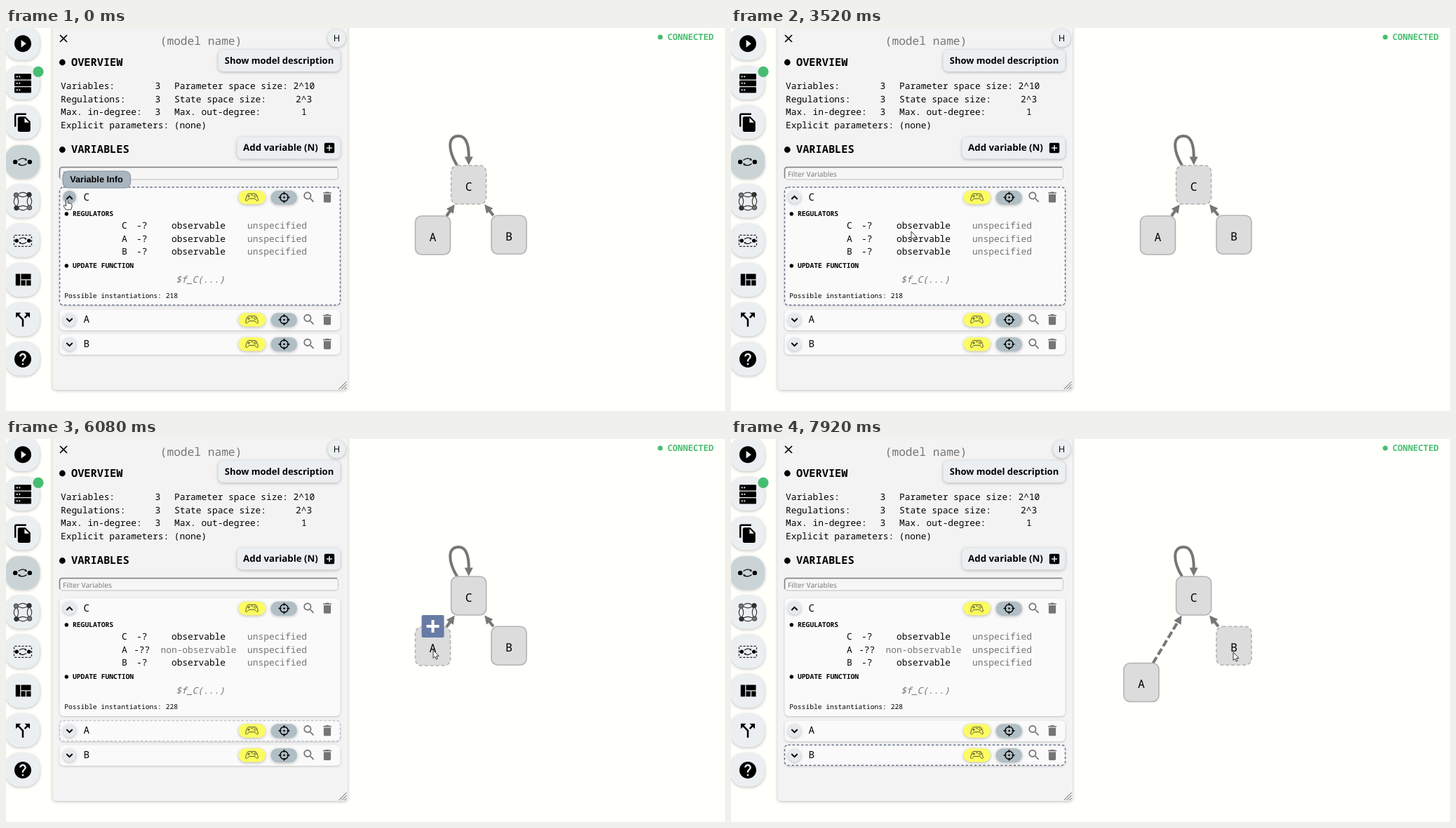
An HTML page that plays this animation: 1025 by 546 pixels, repeating every 8000 ms.

```html
<!DOCTYPE html>
<html lang="en">
<head>
<meta charset="utf-8">
<title>Regulatory network editor</title>
<style>
html, body { margin: 0; width: 100%; height: 100%; overflow: hidden; background: #fffffb; }
svg { display: block; width: 100vw; height: 100vh; }
text { white-space: pre; text-rendering: geometricPrecision; }
.mono { font-family: "Noto Sans Mono", "DejaVu Sans Mono", monospace; }
.sans { font-family: "Open Sans", "Noto Sans", sans-serif; }
.arial { font-family: "Liberation Sans", sans-serif; }
.raised { filter: drop-shadow(0 1px 2px #0004); }
.card { filter: drop-shadow(0 1px 1.5px #0003); }
</style>
</head>
<body>
<svg viewBox="0 0 1025 546"><g id="base"></g><g id="live"></g></svg>
<script>
const LOOP = 8000, STEP = 80;
const BUTTON = '#eceff1', GREY = '#757575', SLATE = '#b0bec5', GREEN = '#48bd72';

const ICON = {
  play: 'M12 2C6.48 2 2 6.48 2 12s4.48 10 10 10 10-4.48 10-10S17.52 2 12 2zm-2 14.5v-9l6 4.5-6 4.5z',
  copy: 'M16 1H4c-1.1 0-2 .9-2 2v14h2V3h12V1zm-1 4l6 6v10c0 1.1-.9 2-2 2H7.99C6.89 23 6 22.1 6 21l.01-14c0-1.1.89-2 1.99-2h7zm-1 7h5.5L14 6.5V12z',
  quilt: 'M10 18h5v-6h-5v6zm-6 0h5V5H4v13zm12 0h5v-6h-5v6zM10 5v6h11V5H10z',
  split: 'M14 4l2.29 2.29-2.88 2.88 1.42 1.42 2.88-2.88L20 10V4zm-4 0H4v6l2.29-2.29 4.71 4.7V20h2v-8.41l-5.29-5.3z',
  help: 'M12 2C6.48 2 2 6.48 2 12s4.48 10 10 10 10-4.48 10-10S17.52 2 12 2zm1 17h-2v-2h2v2zm2.07-7.75l-.9.92C13.45 12.9 13 13.5 13 15h-2v-.5c0-1.1.45-2.1 1.17-2.83l1.24-1.26c.37-.36.59-.86.59-1.41 0-1.1-.9-2-2-2s-2 .9-2 2H8c0-2.21 1.79-4 4-4s4 1.79 4 4c0 .88-.36 1.68-.93 2.25z',
  search: 'M15.5 14h-.79l-.28-.27C15.41 12.59 16 11.11 16 9.5 16 5.91 13.09 3 9.5 3S3 5.91 3 9.5 5.91 16 9.5 16c1.61 0 3.09-.59 4.23-1.57l.27.28v.79l5 4.99L20.49 19l-4.99-5zm-6 0C7.01 14 5 11.99 5 9.5S7.01 5 9.5 5 14 7.01 14 9.5 11.99 14 9.5 14z',
  trash: 'M6 19c0 1.1.9 2 2 2h8c1.1 0 2-.9 2-2V7H6v12zM19 4h-3.5l-1-1h-5l-1 1H5v2h14V4z',
  add: 'M19 3H5c-1.11 0-2 .9-2 2v14c0 1.1.89 2 2 2h14c1.1 0 2-.9 2-2V5c0-1.1-.9-2-2-2zm-2 10h-4v4h-2v-4H7v-2h4V7h2v4h4v2z',
  close: 'M19 6.41L17.59 5 12 10.59 6.41 5 5 6.41 10.59 12 5 17.59 6.41 19 12 13.41 17.59 19 19 17.59 13.41 12z'
};

const icon = (name, x, y, k = 1.2, fill = '#000') =>
  `<path d="${ICON[name]}" fill="${fill}" transform="translate(${x} ${y}) scale(${k}) translate(-12 -12)"/>`;
const rect = (x, y, w, h, r, fill, more = '') =>
  `<rect x="${x}" y="${y}" width="${w}" height="${h}" rx="${r}" fill="${fill}" ${more}/>`;
const dot = (x, y, r, fill = '#000', more = '') => `<circle cx="${x}" cy="${y}" r="${r}" fill="${fill}" ${more}/>`;
const line = (d, color, width, more = '') => `<path d="${d}" fill="none" stroke="${color}" stroke-width="${width}" ${more}/>`;
const at = (x, y, body) => `<g transform="translate(${x} ${y})">${body}</g>`;
const text = (x, y, s, size, more = '', font = 'mono') =>
  `<text class="${font}" x="${x}" y="${y}" font-size="${size}" ${more}>${s}</text>`;
const BOLD = 'font-weight="700"', HEADING = 'font-weight="600"', MID = 'text-anchor="middle"', RAISED = 'class="raised"';

function networkIcon(x, y, k) {
  return `<g transform="translate(${x} ${y}) scale(${k})">` + dot(-10.3, 0, 3.2) + dot(10.3, 0, 3.2) +
    line('M-6-2.5Q0-7 5-3.5M6 2.5Q0 7-5 3.5', '#000', 1.3) +
    '<path d="M6.5-2L2.8-2.5 4.8-5.4ZM-6.5 2L-2.8 2.5-4.8 5.4Z"/></g>';
}

function ringIcon(x, y) {
  const side = [0, 90, 180, 270].map(a => `<g transform="rotate(${a})">` +
    line('M-6-10.5Q0-15 6-10.5M-6-8Q0-4.5 6-8', '#333', 1.1) +
    dot(-9.5, -9, 3.3, a % 180 ? '#333' : GREY, 'stroke="#222" stroke-width=".8"') + '</g>');
  return at(x, y, side.join(''));
}

function sidebar() {
  const ys = [...Array(9).keys()].map(i => 22.3 + i * 56.2);
  let s = ys.map((y, i) => rect(-1, y - 24, 49, 47.5, 20, i === 3 ? '#cad4d7' : BUTTON, RAISED)).join('');
  s += icon('play', 24, ys[0]) + icon('copy', 24, ys[2]) + icon('quilt', 24, ys[6], 1.28) +
    icon('split', 24, ys[7], 1.25) + icon('help', 24, ys[8]);
  for (const y of [65.2, 74.7, 84.2]) s += rect(12, y, 24, 8.2, 1.2, '#000') +
    dot(15.8, y + 4.1, 1.1, BUTTON) + dot(19.3, y + 4.1, 1.1, BUTTON);
  s += networkIcon(23.5, ys[3], 1) + ringIcon(24, ys[4]);
  s += rect(11.5, ys[5] - 8, 25, 16, 1, 'none', 'stroke="#222" stroke-width="1.2" stroke-dasharray="3 2"') + networkIcon(24, ys[5], .85);
  return s + dot(46, 62.3, 7.6, GREEN);
}

function overview() {
  const rows = [
    ['Variables:', 3, 'Parameter space size:', 409.5, '2^10'],
    ['Regulations:', 3, 'State space size:', 413, '2^3'],
    ['Max. in-degree:', 3, 'Max. out-degree:', 421, '1']];
  return rows.map(([a, n, b, x, v], i) => {
    const y = 87 + i * 18.6;
    return text(78, y, a, 12.85) + text(212.5, y, n, 12.85) + text(240, y, b, 12.85) + text(x, y, v, 12.85);
  }).join('') + text(78, 143, 'Explicit parameters: (none)', 12.85);
}

function card(name, y, h) {
  const mid = y + 14.2;
  return rect(76.5, y, 400, h, 6, '#fafafa', 'class="card"') + text(110.5, mid + 4.3, name, 14.2) +
    rect(331.5, mid - 9.5, 38.5, 19.5, 9.7, '#fcfc62', RAISED) +
    at(350.5, mid, line('M-5-5H5Q7-5 9 4 8 7 4 2H-4Q-8 7-9 4-7-5-5-5ZM-4.5-3.5V.5M-6.5-1.5H-2.5M-1.5-3H1.5', '#55552a', 1) +
      dot(4.5, -3, .8, '#55552a') + dot(4.5, 0, .8, '#55552a') + dot(3, -1.5, .8, '#55552a') + dot(6, -1.5, .8, '#55552a')) +
    rect(377.5, mid - 9.5, 37.5, 20, 10, SLATE, RAISED) +
    at(396.5, mid + .3, dot(0, 0, 5.7, 'none', 'stroke="#000" stroke-width="1.5"') + dot(0, 0, 1.3) +
      line('M0-8V-4M0 8V4M-8 0H-4M8 0H4', '#000', 1.4)) +
    icon('search', 432, mid, .85, GREY) + icon('trash', 458, mid, .85, GREY);
}

function chevron(y, up, fill) {
  return dot(90.5, y, 9.3, fill, RAISED) + line(up ? `M86.3 ${y + 3}l4.2-4.2 4.2 4.2` : `M86.3 ${y - 2}l4.2 4.2 4.2-4.2`, '#000', 2);
}

function base() {
  return sidebar() +
    rect(66.5, -10, 420.5, 526, 5, '#f3f3f3', RAISED) +
    icon('close', 82, 15, .8) + text(278, 24, '(model name)', 16.2, `${MID} fill="${GREY}"`) +
    dot(471.5, 14.5, 12.7, BUTTON, RAISED) + text(471.5, 19, 'H', 12.8, MID, 'sans') +
    dot(80.3, 49, 4.4) + text(93, 53.5, 'OVERVIEW', 15.3, HEADING) +
    rect(302.5, 31, 174, 31, 7, BUTTON, RAISED) + text(389.5, 51, 'Show model description', 13, `${MID} ${BOLD}`, 'sans') +
    overview() +
    dot(80.3, 173.5, 4.4) + text(93, 178, 'VARIABLES', 15.3, HEADING) +
    rect(329.5, 155.5, 147, 31, 7, BUTTON, RAISED) + text(391.5, 175.3, 'Add variable (N)', 13.3, `${MID} ${BOLD}`, 'sans') +
    icon('add', 461, 171, .8) +
    rect(76.5, 198.5, 397, 17.5, 4, '#f6f6f6', 'stroke="#d0d0d0" stroke-width="1.3"') +
    line('M76.5 214V202.5Q76.5 198.5 80.5 198.5H472', '#808080', 1.5) +
    text(81, 212, 'Filter Variables', 10.2, `fill="${GREY}"`, 'sans') +
    card('C', 227, 168) + card('A', 401.5, 29.5) + card('B', 436.2, 29.5) +
    chevron(416, false, '#e6eaed') + chevron(451, false, '#e6eaed') +
    dot(86.3, 265, 2.7) + text(95, 268.3, 'REGULATORS', 9.7, BOLD) +
    dot(86.3, 339, 2.7) + text(95, 342.2, 'UPDATE FUNCTION', 9.7, BOLD) +
    text(277, 362.5, '$f_C(...)', 12.85, `${MID} fill="${GREY}" font-style="italic"`) +
    line('M474.5 515l11-11M478.5 515l7-7M482.5 515l3-3', '#555', 1) +
    dot(932.7, 13, 3.5, GREEN) + text(943, 16.7, 'CONNECTED', 12.2, `${BOLD} fill="${GREEN}"`);
}

// Pointer track: time, x, y
const TRACK = [
  [0, 87, 244], [160, 96, 248], [400, 152, 266], [640, 208, 277], [880, 233, 279], [960, 234, 279],
  [1120, 241, 283], [1360, 241, 283], [1440, 242, 283], [3440, 242, 283], [3520, 257, 290], [3600, 260, 295],
  [4800, 260, 295], [5040, 264, 299], [5280, 266, 299], [5520, 266, 299], [5600, 300, 301], [5680, 390, 301],
  [5760, 475, 299], [5840, 545, 300], [5920, 590, 301], [6000, 607, 301], [6080, 609, 301], [6400, 609, 301],
  [6720, 588, 354], [6960, 588, 354], [7360, 660, 326], [7600, 710, 307], [7680, 716, 304], [LOOP, 716, 304]];

const ramp = (t, a, b) => Math.min(1, Math.max(0, (t - a) / (b - a)));
const within = (t, a, b) => t >= a && t < b;

function pointer(t) {
  const i = TRACK.findIndex(p => p[0] > t), [a, x, y] = TRACK[i - 1], [b, u, v] = TRACK[i];
  const k = ramp(t, a, b);
  const hand = t < 160 || within(t, 880, 3520) || within(t, 3600, 5760);
  const shape = hand
    ? 'M-1.5 8V1.2Q-1.5 0-.3 0T1 1.2V5.5L5.5 6.4Q7 7 7 8.5V11L5.5 15H-1.5L-5 9.8Q-4.5 8-3 8.6L-1.5 10Z'
    : 'M0 0V11.5L2.6 9.1 4.4 13 6.2 12.2 4.5 8.4H8Z';
  return at(x + (u - x) * k, y + (v - y) * k, `<path d="${shape}" fill="#fff" stroke="#222" stroke-width=".9" stroke-linejoin="round"/>`);
}

function regulator(name, i, hidden, hovered, bold) {
  const y = 286 + i * 18.7;
  const style = (on, grey) => `${MID} ${on ? BOLD : ''} fill="${!grey ? '#000' : on ? '#666' : GREY}"`;
  return (hovered ? rect(83, y - 12.3, 386.5, 15.5, 0, '#e8ebed') : '') +
    text(165, y, name, 12.85) + text(193.7, y, hidden ? '-??' : '-?', 12.85, MID) +
    text(274.5, y, hidden ? 'non-observable' : 'observable', 12.85, style(bold === 1, hidden)) +
    text(386.5, y, 'unspecified', 12.85, style(bold === 2, true));
}

const EDGE = '#767676';
const wire = (d, dashed) => line(d, EDGE, 4, dashed ? 'stroke-dasharray="10 4"' : '');
const glow = (d, cap) => line(d, '#000', 26, `opacity=".12" stroke-linecap="${cap}"`);
const head = (x, y, angle) => `<path d="M0 0L-12-6V6Z" fill="${EDGE}" transform="translate(${x} ${y}) rotate(${angle})"/>`;

function edgeToC(node, dashed, lit) {
  const dx = 659.5 - node.x, dy = 223.5 - node.y, len = Math.hypot(dx, dy);
  const onLine = y => node.x + (y - node.y) * dx / dy;
  const y1 = node.y - 27.5, y2 = 251.5, x2 = onLine(y2);
  const start = `M${onLine(y1)} ${y1}L`;
  return wire(`${start}${x2 - dx / len * 9} ${y2 - dy / len * 9}`, dashed) +
    head(x2, y2, Math.atan2(dy, dx) * 180 / Math.PI) + (lit ? glow(`${start}${x2} ${y2}`, 'round') : '');
}

function node(name, { x, y }, selected) {
  return rect(x - 25, y - 27.5, 50, 55, 9, '#dcdcdc', `stroke="#b3b3b3" stroke-width="1.6" ${selected ? 'stroke-dasharray="5 3"' : ''}`) +
    text(x, y + 8.3, name, 16.5, MID);
}

const plus = ({ x, y }) => at(x, y - 28.5, rect(-16, -16, 32, 32, 2, '#687ba5') + line('M-9 0H9M0-9V9', '#fff', 4));

const selection = (y, h, alpha) => alpha
  ? rect(76.5, y, 400, h, 5, 'none', `stroke="#657089" stroke-width="1.5" stroke-dasharray="3.2 3" opacity="${alpha}"`) : '';

function live(t) {
  const litC = within(t, 720, 3520), litA = within(t, 3600, 5840);
  const hiddenC = within(t, 1600, 2720), hiddenA = t >= 4240;
  const count = within(t, 1840, 2960) || t >= 4320 ? 228 : 218;
  const selected = t < 6000 ? 'C' : t < 7600 ? 'A' : 'B';
  const drag = ramp(t, 6400, 6720);
  const A = { x: 608.5 - 23.5 * drag, y: 295.5 + 51.5 * drag }, B = { x: 717, y: 294.7 }, C = { x: 659.6, y: 223.5 };
  const loop = 'M643 196C631 176 628 154 645.5 154C658 154 660 172 659.7 ';
  const tip = 1 - ramp(t, 160, 320);

  return chevron(241, true, t < 160 ? '#a9b6be' : '#e6eaed') +
    regulator('C', 0, hiddenC, litC, t >= 880 && litC ? 1 : 0) +
    regulator('A', 1, hiddenA, litA, litA ? (t < 5680 ? 1 : 2) : 0) +
    regulator('B', 2, false, false, 0) +
    text(83.3, 385.3, 'Possible instantiations: ' + count, 9.63) +
    selection(227, 168, selected === 'C' ? 1 : 0) +
    selection(401.5, 29, selected === 'A' ? ramp(t, 6020, 6200) : 0) +
    selection(436.2, 29, selected === 'B' ? ramp(t, 7540, 7720) : 0) +
    wire(loop + 186, hiddenC) + head(659.7, 195.5, 90) + (litC ? glow(loop + 196, 'butt') : '') +
    edgeToC(A, hiddenA, litA) + edgeToC(B, false, false) +
    node('C', C, selected === 'C') + node('A', A, selected === 'A') + node('B', B, selected === 'B') +
    (within(t, 6000, 6480) ? plus(A) : '') + (within(t, 7600, 7920) ? plus(B) : '') +
    (tip ? `<g opacity="${tip}">` + rect(81, 204, 96.5, 24, 8, '#a9b6bf', 'stroke="#8795a3" stroke-width="1.2"') +
      text(129, 220.3, 'Variable Info', 12.7, `${MID} ${BOLD}`, 'arial') + '</g>' : '') +
    pointer(t);
}

document.getElementById('base').innerHTML = base();
const layer = document.getElementById('live');
const began = performance.now();
let shown = -1;

function tick() {
  const t = Math.floor((performance.now() - began) % LOOP / STEP) * STEP;
  if (t !== shown) layer.innerHTML = live(shown = t);
  requestAnimationFrame(tick);
}
tick();
</script>
</body>
</html>
```
